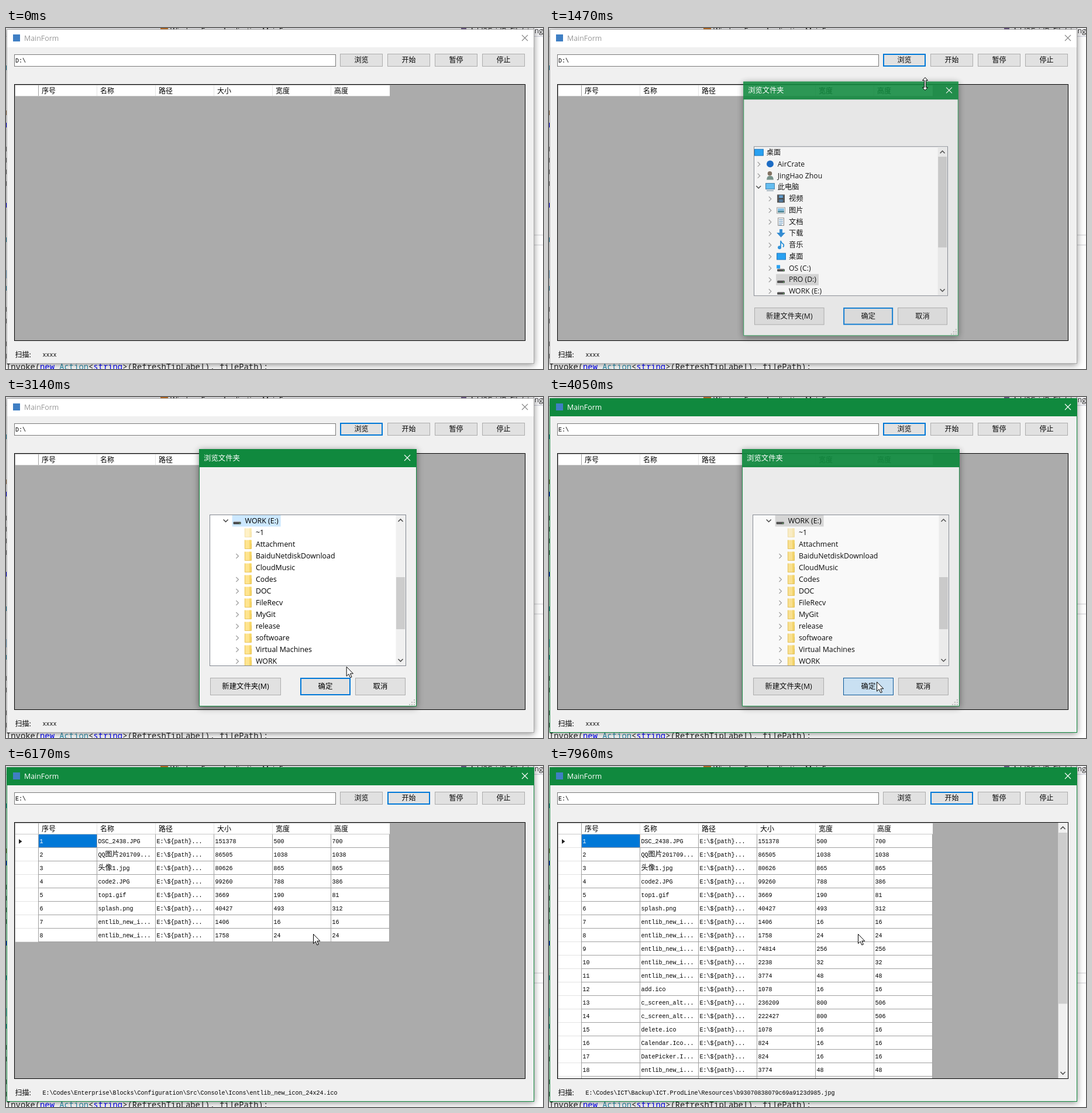
An HTML page that plays this animation: 918 px wide and 583 px high, repeating every 8000 ms.

```html
<!DOCTYPE html>
<html lang="zh">
<head>
<meta charset="utf-8">
<title>MainForm</title>
<style>
html, body { margin: 0; width: 100%; height: 100%; overflow: hidden; background: #fff; }
svg { display: block; width: 918px; height: 583px; }
text { white-space: pre; }
.ui { font: 12.4px "Open Sans", "Noto Sans CJK SC", "Noto Sans CJK", sans-serif; }
.song, .cell tspan { font: 12px "Noto Sans CJK SC", "Noto Sans CJK", sans-serif; }
.cell { font: 10px "Liberation Mono", "Noto Sans CJK SC", monospace; }
.code { font: 13.83px "Noto Sans Mono", monospace; }
.mid { text-anchor: middle; }
.shadow { filter: drop-shadow(0 2px 6px rgba(0, 0, 0, .45)); }
.line { fill: none; }
</style>
</head>
<body>
<svg id="stage" viewBox="0 0 918 583"></svg>
<script>
const LOOP = 8000, GREEN = '#10893e', BLUE = '#0078d7';
const raw = String.raw;
const $ = id => document.getElementById(id);
const set = (el, attrs) => { for (const k in attrs) el.setAttribute(k, attrs[k]); };
const show = (el, on) => el.setAttribute('visibility', on ? 'inherit' : 'hidden');
const clamp = v => Math.max(0, Math.min(1, v));

const rect = (x, y, w, h, fill, more = '') =>
  `<rect x="${x}" y="${y}" width="${w}" height="${h}" fill="${fill}" ${more}/>`;
const frame = (x, y, w, h, fill, stroke, more = '') =>
  rect(x + .5, y + .5, w - 1, h - 1, fill, `stroke="${stroke}" ${more}`);
const text = (x, y, s, cls, fill = '#000', more = '') =>
  `<text x="${x}" y="${y}" class="${cls}" fill="${fill}" ${more}>${s}</text>`;
const line = (d, stroke, width = 1, more = '') =>
  `<path class="line" d="${d}" stroke="${stroke}" stroke-width="${width}" ${more}/>`;
const cell = (x, y, s, fill) =>
  text(x, y, s.replace(/[\u4e00-\u9fff]+/g, '<tspan>$&</tspan>'), 'cell', fill);
const cross = (x, y, stroke, id) =>
  line(`M${x - 5} ${y - 5}l10 10m0-10l-10 10`, stroke, 1.1, `id="${id}"`);

// ---- buttons
const buttons = {
  browse: [571, 44, 73, 22, '浏览', 'song'],
  start: [652, 44, 73, 22, '开始', 'song'],
  pause: [733, 44, 73, 22, '暂停', 'song'],
  stop: [814, 44, 73, 22, '停止', 'song'],
  make: [349, 480, 121, 30, '新建文件夹(M)', 'ui'],
  ok: [503, 480, 86, 30, '确定', 'ui'],
  cancel: [597, 480, 86, 30, '取消', 'ui']
};
const modes = {
  plain: ['#e1e1e1', '#adadad', 1],
  main: ['#e1e1e1', BLUE, 2],
  hot: ['#e5f1fb', BLUE, 1],
  down: ['#cce4f7', '#005499', 1]
};
function button(id) {
  const [x, y, w, h, label, cls] = buttons[id];
  return frame(x, y, w, h, '#e1e1e1', '#adadad', `id="${id}"`) +
    text(x + w / 2, y + h / 2 + 4.4, label, cls + ' mid');
}
function paint(id, mode) {
  const [x, y, w, h] = buttons[id], [fill, stroke, b] = modes[mode];
  set($(id), { x: x + b / 2, y: y + b / 2, width: w - b, height: h - b, fill, stroke, 'stroke-width': b });
}
const over = (id, [px, py]) => {
  const [x, y, w, h] = buttons[id];
  return px >= x && px < x + w && py >= y && py < y + h;
};

// ---- scroll bars
function scrollBar(x, top, bottom, id) {
  const c = x + 8;
  return rect(x, top, 16.5, bottom - top, '#f0f0f0') +
    rect(x + .5, top + 17, 15, 10, '#cdcdcd', `id="${id}"`) +
    line(`M${c - 4} ${top + 11}l4-4 4 4M${c - 4} ${bottom - 11}l4 4 4-4`, '#505050', 1.6);
}

// ---- folder tree
const icons = {
  desk: rect(.5, -5.5, 15, 11, '#18a0fb', 'stroke="#0a6ebd"'),
  cloud: '<circle cx="8" cy="0" r="6" fill="#0a64c8"/>',
  user: '<path d="M2 7.5q0-7 6-7t6 7z" fill="#6f8f86"/><circle cx="7.5" cy="-3.5" r="3.8" fill="#7d6b58"/>',
  pc: rect(.5, -6.5, 15, 10, '#5cc0fa', 'stroke="#3a7ca8"') + rect(2, 5.5, 12, 1.5, '#8aa4b5'),
  film: rect(1, -7, 13, 14, '#333') + rect(4, -6, 7, 5, '#5b9bd0') + rect(4, 1, 7, 5, '#47739c') +
    line('M2.5-6v13m10-13v13', '#ddd', 1, 'stroke-dasharray="1 2"'),
  image: frame(0, -5, 15, 11, '#fff', '#999') + rect(2, -3, 11, 4, '#7cc4f0') + rect(2, 1, 11, 3, '#3c7f91'),
  doc: frame(2, -7, 11, 14, '#fff', '#8a8a8a') + line('M4-3.5h7m-7 3h7m-7 3h7m-7 3h5', '#4a90c8'),
  down: '<path d="M5-7h5v6h5L7.500 7 0-1h5z" fill="#2488d8"/>',
  note: '<circle cx="5" cy="4.500" r="3" fill="#1e8fe0"/>' + line('M7 5V-7q1 4 5 6 1 3-1 5', '#1e8fe0', 1.8),
  disk: rect(1, 2, 13, 4, '#444', 'rx="1"') + rect(2, 1, 11, 1, '#bbb') + rect(11, 4, 2, 1, '#6d6'),
  folder: rect(1, -7, 11, 15, '#ffe48f') + rect(9, -7, 4, 15, '#f7d768') + line('M1.500-7v15h11v-9', '#e3bc4c', .8)
};
icons.system = icons.disk + rect(0, -5, 6, 6, '#18a0fb');

const home = ['0 desk - 桌面', '1 cloud > AirCrate', '1 user > JingHao Zhou', '1 pc v 此电脑', '2 film > 视频',
  '2 image > 图片', '2 doc > 文档', '2 down > 下载', '2 note > 音乐', '2 desk > 桌面',
  '2 system > OS (C:)', '2 disk > PRO (D:)', '2 disk > WORK (E:)'];
const work = ['2 disk v WORK (E:)', '3 folder - ~1', '3 folder - Attachment', '3 folder > BaiduNetdiskDownload',
  '3 folder - CloudMusic', '3 folder > Codes', '3 folder > DOC', '3 folder > FileRecv', '3 folder > MyGit',
  '3 folder > release', '3 folder > softwoare', '3 folder > Virtual Machines', '3 folder > WORK'];

function tree(id, rows) {
  const items = rows.map((row, i) => {
    const [, depth, kind, fold, label] = row.match(/(\d) (\w+) (\S) (.+)/);
    const x = 349 + depth * 19.3, y = 211.5 + i * 20;
    const mark = fold === '>' ? line(`M${x - 13.500} ${y - 3.500}l4 4-4 4`, '#a0a0a0', 1.3)
      : fold === 'v' ? line(`M${x - 16} ${y - 2}l4 4 4-4`, '#404040', 1.5) : '';
    return mark + `<g transform="translate(${x} ${y})" opacity="${label === '~1' ? .5 : 1}">${icons[kind]}</g>` +
      text(x + (depth > 2 ? 20 : 21), y + 4.5, label, 'ui');
  });
  return `<g id="${id}">` + rect(0, 0, 0, 19.5, '#d9d9d9', `id="${id}Sel"`) +
    rect(0, 0, 0, 19.5, '#e5f3ff', `id="${id}Hot"`) + items.join('') + '</g>';
}

// ---- file grid
const columns = ['序号', '名称', '路径', '大小', '宽度', '高度'];
const files = `DSC_2438.JPG|BaiduNetd|151378|500|700
QQ图片201709...|BaiduNetd|86505|1038|1038
头像1.jpg|BaiduNetd|80626|865|865
code2.JPG|Codes\\Cod|99260|788|386
top1.gif|Codes\\Cod|3669|190|81
splash.png|Codes\\Ent|40427|493|312
entlib_new_i...|Codes\\Ent|1406|16|16
entlib_new_i...|Codes\\Ent|1758|24|24
entlib_new_i...|Codes\\Ent|74814|256|256
entlib_new_i...|Codes\\Ent|2238|32|32
entlib_new_i...|Codes\\Ent|3774|48|48
add.ico|Codes\\Ent|1078|16|16
c_screen_alt...|Codes\\Ent|236209|800|506
c_screen_alt...|Codes\\Ent|222427|800|506
delete.ico|Codes\\Ent|1078|16|16
Calendar.Ico...|Codes\\Ent|824|16|16
DatePicker.I...|Codes\\Ent|824|16|16
entlib_new_i...|Codes\\Ent|3774|48|48
entlib_new_i...|Codes\\Ent|2238|32|32`.split('\n').map(s => s.split('|'));
const found = [5520, 5590, 5590, 5670, 5750, 5900, 6030, 6170, 6320, 6400, 6550, 6620,
  6790, 6940, 7090, 7260, 7410, 7640, 7790, 7790, 7870, 7870, 7870, 7960, 7960];

function gridRow([name, path, ...nums], i) {
  const y = 116 + i * 23;
  const values = [i + 1, name, raw`E:\${path}...`, ...nums];
  return `<g id="row${i}">` + rect(16, y + 1, 640, 22, '#fff') +
    (i ? '' : rect(56, y + 1, 99, 22, BLUE) + `<path d="M22 ${y + 9}l5.500 4-5.500 4z" fill="#222"/>`) +
    line(`M16 ${y + 23.5}h39`, '#e3e3e3') +
    line(`M55 ${y + 23.5}h601` + [0, 1, 2, 3, 4, 5, 6].map(c => `M${55.5 + c * 100} ${y + 1}v23`).join(''), '#a0a0a0') +
    values.map((v, c) => cell(57.5 + c * 100, y + 16, String(v), i || c ? '#000' : '#fff')).join('') + '</g>';
}

const base = raw`E:\Codes\Enterprise\Blocks\Configuration\Src` + '\\';
const scans = [
  [0, 'xxxx'],
  [5440, raw`E:\Attachment\readme.txt`],
  [5520, raw`E:\BaiduNetdiskDownload\DSC_2438.JPG`],
  [5590, raw`E:\BaiduNetdiskDownload\头像1.jpg`],
  [5670, raw`E:\Codes\CodeTool\Images\code2.JPG`],
  [5750, raw`E:\Codes\CodeTool\Images\top1.gif`],
  [5900, raw`E:\Codes\Enterprise\Blocks\splash.png`],
  [6030, base + raw`Console\Icons\entlib_new_icon_16x16.ico`],
  [6170, base + raw`Console\Icons\entlib_new_icon_24x24.ico`],
  [6320, base + raw`Console\Icons\entlib_new_icon_256x256.ico`],
  [6400, base + raw`Console\Icons\entlib_new_icon_32x32.ico`],
  [6550, base + raw`Console\Icons\entlib_new_icon_48x48.ico`],
  [6620, base + raw`Design\Resources\add.ico`],
  [6790, base + raw`Design\Configuration.Design.HostAdapter\Resources\c_screen.png`],
  [7090, base + raw`Design\Configuration.Design.HostAdapter\Resources\delete.ico`],
  [7260, base + raw`Design\Controls\Calendar.Icon.bmp`],
  [7410, base + raw`Design\Controls\DatePicker.Icon.bmp`],
  [7640, base + raw`Console\Icons\entlib_new_icon_48x48.ico`],
  [7790, raw`E:\Codes\ICT\Backup\ICT.ProdLine\Resources\title.png`],
  [7960, raw`E:\Codes\ICT\Backup\ICT.ProdLine\Resources\b93070838079c69a9123d985.jpg`]
];

// ---- scene
const tick = (y, fill, h = 8) => rect(0, y, 1.5, h, fill);
const span = (s, fill) => `<tspan fill="${fill}">${s}</tspan>`;

const backdrop = rect(0, 0, 918, 583, '#fff') + rect(0, 0, 918, 14, '#f4f4f6') + rect(0, 14, 918, 1, '#ccceda') +
  rect(264, 0, 13, 4, '#c8762a') + rect(778, 0, 9, 4, '#75608f') +
  text(281, 9, 'WindowsFormsApplication.MainForm', 'ui', '#1e1e1e') +
  text(918, 9, 'Add2GridByFile(string', 'ui', '#1e1e1e', 'text-anchor="end"') +
  rect(900, 353, 18, 2, '#e6e6e8') + rect(900, 370, 18, 2, '#e6e6e8') +
  tick(64, '#2b91af') + tick(141, '#a67c52') + tick(162, '#00f') + [203, 222, 242, 262, 477, 497, 536, 557]
    .map(y => tick(y, '#777')).join('') + tick(299, '#00f') + tick(358, '#2b91af') +
  tick(414, '#8cc4e8', 14) + tick(441, '#2b91af') +
  text(0, 584, 'Invoke(' + span('new', '#00f') + ' ' + span('Action', '#2b91af') + '&lt;' + span('string', '#00f') +
    '&gt;(RefreshTipLabel), filePath);', 'code', '#222');

const mainForm = rect(1, 2, 902, 572, '#f0f0f0', 'class="shadow"') +
  frame(1, 2, 902, 572, '#f0f0f0', '#aaa', 'id="edge"') + rect(2, 3, 900, 30, '#fff', 'id="bar"') +
  rect(12, 11, 12, 12, '#3f7fc4') + text(31, 22, 'MainForm', 'ui', '#999', 'id="title"') + cross(887, 17, '#888', 'close') +
  frame(14, 45, 550, 21, '#fff', '#7a7a7a') + text(16, 58.5, '', 'cell', '#000', 'id="folder"') +
  ['browse', 'start', 'pause', 'stop'].map(button).join('') +
  frame(14, 96, 874, 439, '#ababab', '#000') + rect(16, 98, 640, 18, '#fff') +
  line('M55.500 98v18', '#a0a0a0') + line([1, 2, 3, 4, 5].map(c => `M${55.5 + c * 100} 98v18`).join(''), '#e3e3e3') +
  line('M16 116.500h640', '#c8c8c8') +
  columns.map((c, i) => text(61 + i * 100, 111.5, c, 'song')).join('') +
  `<g clip-path="url(#gridClip)">${files.map(gridRow).join('')}</g>` +
  `<g id="gridBar">${scrollBar(870.500, 97, 534, 'gridThumb')}</g>` +
  text(15.5, 562.5, '扫描:', 'song') + text(62.5, 562, '', 'cell', '#000', 'id="scan"');

const dots = [[8, 0], [4, 4], [8, 4], [0, 8], [4, 8], [8, 8]].map(([x, y]) => rect(689 + x, 517 + y, 2, 2, '#bbb')).join('');
const dialog = '<g id="dialog">' + rect(330, 89, 372, 440, '#f0f0f0', 'class="shadow"') +
  frame(330, 89, 372, 440, '#f0f0f0', GREEN) + rect(330, 89, 372, 31, GREEN) +
  text(338, 109, '浏览文件夹', 'ui', '#fff') + cross(686, 104, '#fff', 'dialogClose') +
  frame(348, 201, 336, 259, '#fff', '#828790') +
  `<g clip-path="url(#treeClip)">${tree('home', home)}${tree('work', work)}${scrollBar(666.5, 202, 459, 'treeThumb')}</g>` +
  ['make', 'ok', 'cancel'].map(button).join('') + dots + '</g>' +
  '<g id="tip">' + frame(470, 466, 110, 38, '#fff', '#bbb') +
  text(475, 481, '可用空间: 311 GB', 'ui', '#575757') + text(475, 498, '总大小: 465 GB', 'ui', '#575757') + '</g>';

const pointer = '<g id="pointer" fill="#fff" stroke="#000">' +
  '<path id="arrow" d="M.5.5v16l3.700-3.500 2.600 6 2.600-1-2.600-5.800h5z"/>' +
  '<path id="hand" d="M-2 1.500q1.800-2.500 3.500 0v6l5 1q3 .6 3 3v4q0 3-2 5v2.500H-1v-2.500q-3-3-5-6.500-.5-2.500 2-2l2 2z"/>' +
  '<path id="size" d="M0-11l4.500 5H1.300V6h3.200L0 11l-4.500-5h3.200V-6h-3.200z"/></g>';

$('stage').innerHTML = '<defs><clipPath id="gridClip">' + rect(15, 97, 872, 437, '#000') + '</clipPath><clipPath id="treeClip">' +
  rect(349, 202, 334, 257, '#000') + '</clipPath></defs>' + backdrop + mainForm + dialog + pointer;

// ---- motion
const path = [
  [70, 763, 344], [150, 709, 256], [370, 709, 256], [600, 600, 130], [720, 557, 80], [920, 595, 57], [1390, 607, 57],
  [1470, 643, 95], [1560, 640, 150], [1710, 615, 300], [1930, 600, 330], [2300, 463, 447], [2760, 463, 447],
  [2900, 470, 431], [3200, 609, 468], [3510, 575, 482], [3610, 572, 486], [3750, 568, 501], [3900, 563, 490], [4050, 560, 488],
  [4230, 571, 238], [4450, 571, 238], [4650, 620, 140], [4920, 720, 35], [5070, 694, 54], [5440, 694, 54],
  [5840, 560, 240], [6100, 525, 287], [6320, 525, 287], [6550, 528, 287], [8000, 528, 287]
];
function cursorAt(t) {
  const i = path.findIndex(p => p[0] > t);
  if (i < 1) return path[i < 0 ? path.length - 1 : 0].slice(1);
  const [t0, x0, y0] = path[i - 1], [t1, x1, y1] = path[i], k = (t - t0) / (t1 - t0);
  return [x0 + (x1 - x0) * k, y0 + (y1 - y0) * k];
}

const labels = { home: [...document.querySelectorAll('#home text')], work: [...document.querySelectorAll('#work text')] };
function markRow(id, part, i) {
  const label = labels[id][i], el = $(id + part);
  show(el, !!label);
  if (!label) return;
  const x = +label.getAttribute('x') - 22;
  set(el, { x, y: 202 + i * 20, width: label.getComputedTextLength() + 26 });
}
function rowUnder(id, [x, y]) {
  const i = Math.floor((y - 202) / 20), label = labels[id][i];
  if (!label || y > 459) return -1;
  const left = +label.getAttribute('x');
  return x > left - 22 && x < left + label.getComputedTextLength() + 8 ? i : -1;
}

function draw(t) {
  const pos = cursorAt(t);
  const active = t >= 1090 && t < 1390 || t >= 4050;
  const open = t >= 1390 && t < 4220;
  const expanded = t >= 2610;

  set($('edge'), { stroke: active ? GREEN : '#aaa' });
  set($('bar'), { fill: active ? GREEN : '#fff' });
  set($('title'), { fill: active ? '#fff' : '#999' });
  set($('close'), { stroke: active ? '#fff' : '#888' });
  $('folder').textContent = t < 4050 ? 'D:\\' : 'E:\\';

  const free = !open;
  paint('browse', t >= 1090 && t < 1250 ? 'down' : free && over('browse', pos) ? 'hot'
    : t >= 1090 && t < 5370 ? 'main' : 'plain');
  paint('start', t >= 5370 && t < 5440 ? 'down' : free && over('start', pos) ? 'hot' : t >= 5370 ? 'main' : 'plain');
  paint('ok', t >= 3900 ? 'down' : t >= 3610 ? 'hot' : 'main');

  const count = found.filter(f => f <= t).length;
  files.forEach((f, i) => show($('row' + i), i < count));
  show($('gridBar'), count > 18);
  set($('gridThumb'), { height: 404 * Math.min(1, 18.1 / Math.max(count, 1)) });
  const status = scans.filter(s => s[0] <= t).pop()[1];
  $('scan').innerHTML = status.replace(/[\u4e00-\u9fff]+/g, '<tspan>$&</tspan>');

  show($('dialog'), open);
  const rise = 1 - (1 - clamp((t - 1390) / 160)) ** 3;
  const fall = clamp((t - 4040) / 180);
  const size = .9 + .1 * rise - .1 * fall * fall;
  set($('dialog'), {
    opacity: rise * (1 - fall),
    transform: `translate(516 309) scale(${size}) translate(-516 -309)`
  });
  show($('dialogClose'), t < 4040);
  show($('home'), !expanded);
  show($('work'), expanded);
  set($('treeThumb'), expanded ? { y: 308, height: 89 } : { y: 219, height: 157 });

  const id = expanded ? 'work' : 'home';
  const hot = open && t > 1700 ? rowUnder(id, pos) : -1;
  markRow('home', 'Sel', 11);
  markRow('work', 'Sel', 0);
  set($('workSel'), { fill: t < 3900 ? '#cce8ff' : '#d9d9d9' });
  if (open) markRow(id, 'Hot', hot);
  else show($(id + 'Hot'), false);

  show($('tip'), t >= 2350 && t < 2610);
  set($('tip'), { opacity: clamp((t - 2350) / 150) });

  const sizing = t >= 1440 && t < 1540;
  show($('pointer'), t >= 70);
  set($('pointer'), { transform: `translate(${pos})` });
  show($('size'), sizing);
  show($('hand'), hot >= 0);
  show($('arrow'), !sizing && hot < 0);
}

const began = performance.now();
function loop() {
  draw((performance.now() - began) % LOOP);
  requestAnimationFrame(loop);
}
loop();
</script>
</body>
</html>
```
